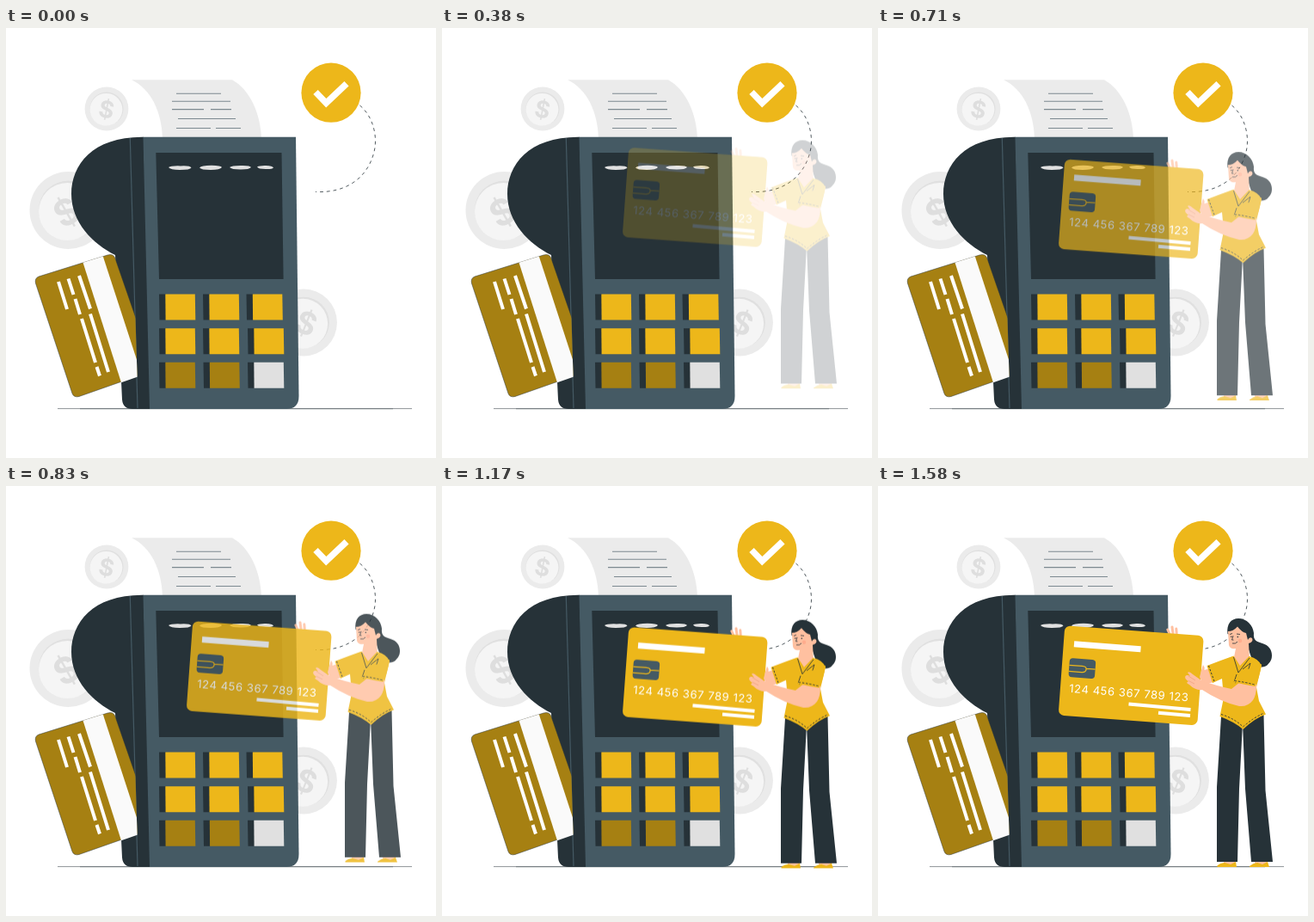
These frames come from a looping animation (500x500 px, 1.62 s). An HTML page:

```html
<!DOCTYPE html>
<html lang="en">
<head>
<meta charset="utf-8">
<title>Card payment</title>
<style>
  html, body { margin: 0; width: 100%; height: 100%; overflow: hidden; background: #fff; }
  svg { display: block; width: 100vw; height: 100vh; }
  .gold { fill: #edb71a; }
  .ochre { fill: #a68012; }
  .dark { fill: #263238; }
  .slate { fill: #455a64; }
  .skin { fill: #ffc0a0; }
  .light { fill: #e0e0e0; }
  .line { fill: none; stroke: #263238; stroke-width: .8; }
  .white { fill: none; stroke: #fff; stroke-width: 4; }
  .seam { fill: none; stroke: #263238; stroke-width: .9; stroke-dasharray: 2.4 1.8; }
  .dollar { font: 700 42px Inter, sans-serif; text-anchor: middle; fill: #dedede; }
  .digits { font: 400 13px Inter, sans-serif; letter-spacing: .6px; fill: #fff; }

  .drop { animation: drop 1620ms infinite, show 1620ms step-end infinite; }
  @keyframes drop {
    0% { transform: translateY(-30px); opacity: 0; }
    .93% {
      transform: translateY(-30px); opacity: 0;
      animation-timing-function: cubic-bezier(.36, -.01, .5, 1.38);
    }
    93.5%, 100% { transform: translateY(0); opacity: 1; }
  }
  @keyframes show {
    0% { visibility: hidden; }
    10.49%, 100% { visibility: visible; }
  }
</style>
</head>
<body>
<svg viewBox="0 0 500 500">
  <defs>
    <g id="coin">
      <circle r="45" fill="#ebebeb"/>
      <circle r="34.5" class="light"/>
      <circle r="33.5" cx="-1" cy="1.5" fill="#f5f5f5"/>
    </g>
    <g id="key">
      <path class="dark" d="M0 0H8V30H.5Z"/>
      <path d="M7.3 0H41.8L42.3 30H7.6Z"/>
    </g>
    <clipPath id="slot"><path d="M0 240H147.5L153.3 430H0Z"/></clipPath>
  </defs>

  <!-- coins -->
  <use href="#coin" x="72.5" y="212"/>
  <text class="dollar" transform="translate(70 214) rotate(-30)" dy=".36em">$</text>
  <use href="#coin" transform="translate(117 94) scale(.565)"/>
  <text class="dollar" transform="translate(117 94.5) rotate(11) scale(.65)" dy=".36em">$</text>
  <use href="#coin" transform="translate(346 342.5) scale(.865)"/>
  <text class="dollar" transform="translate(349 343) rotate(22) scale(.86)" dy=".36em">$</text>

  <!-- ground -->
  <path class="line" d="M60 442.6H472" stroke-width=".6" opacity=".65"/>
  <path class="line" d="M86 442.8H450" opacity=".5"/>

  <!-- receipt -->
  <path fill="#ebebeb" d="M146 60.3H263C284 72 296 100 297 128H182C181 98 169 71 146 60.3Z"/>
  <path fill="none" stroke="#7c8990" stroke-width="1.1"
    d="M198 76.3H250M193 85.2H261M193 94.6H230M238 94.6H262M200 105.5H267M198 116.5H238M244 116.5H273"/>

  <!-- terminal -->
  <path class="dark" d="M160 126.7C101 126 76 159 76 193C76 226 101 251 127 264L135 432Q136 443 147 443H170Z"/>
  <path class="slate" d="M159.5 126.7H337L340.5 428Q340.500 443 326 443H167Z"/>
  <path fill="none" stroke="#455a64" stroke-width="1.2" d="M144.300 128L153 442"/>
  <path class="dark" d="M174.300 145H320.500L322.600 292H178Z"/>
  <path class="light" d="M189 162Q192 160 203 160.400Q214 159.800 215.500 162.500Q214 165 202 165Q191 165 189 162Z
    M225 162.500Q227 160 239 159.800Q250 160 251 162Q249 165 238 165Q227 165 225 162.500Z
    M260 162Q262 160 273 160Q284 159.700 285 162Q283 164.500 273 164.500Q262 164.500 260 162Z
    M292 161.500Q295 159.800 302 160Q310 160 311 162.500Q309 164.400 302 164Q293 164 292 161.500Z"/>
  <g class="gold">
    <use href="#key" x="178" y="309.500"/>
    <use href="#key" x="229" y="309.500"/>
    <use href="#key" x="279.500" y="309.500"/>
    <use href="#key" x="178" y="349.300"/>
    <use href="#key" x="229" y="349.300"/>
    <use href="#key" x="281" y="349.300"/>
  </g>
  <g class="ochre">
    <use href="#key" x="178" y="388.800"/>
    <use href="#key" x="229.500" y="388.800"/>
  </g>
  <use class="light" href="#key" x="281" y="388.800"/>

  <!-- swiped card -->
  <g clip-path="url(#slot)">
    <path class="ochre" stroke="#263238" stroke-width=".5"
      d="M38 289L118 264Q125 262 127 268L172 398L85 428.500Q79 430 77 425L34.500 297Q33 291 38 289Z"/>
    <path fill="#fafafa" d="M89.500 272.800L112.800 265.600L158 404L134 412.200Z"/>
    <path class="white" d="M61 295L71 327M72.500 291.500L78.500 310M85 288L98 326.500M80.500 315L86 333
      M88 338L104 389M98 332.500L119 400M105.500 394L109 404.500"/>
  </g>

  <!-- approval -->
  <path class="line" stroke-dasharray="3.800 4" d="M411.500 90C427 103 433 127 427.500 146C419 176 394 192 360 190.500"/>
  <circle class="gold" cx="378" cy="75.200" r="34.600"/>
  <path fill="none" stroke="#fff" stroke-width="7.500" d="M360 74.500L372.300 87.300L396 64.800"/>

  <g class="drop">
    <!-- held card -->
    <path fill="none" stroke="#ffc0a0" stroke-width="3" stroke-linecap="round"
      d="M340 174L336.800 167M343.500 175L342 164M347.500 175L346.800 166"/>
    <rect class="gold" width="162" height="104.500" rx="6.500"
      transform="translate(217.300 162.300) rotate(4.200)"/>
    <path class="white" stroke-width="7" style="stroke-width:7px" d="M228 183.800L305.500 189.800"/>
    <path class="white" d="M291.500 253.500L363.500 260M326 263.800L363 267"/>
    <g transform="translate(223 200) rotate(4.200)">
      <rect class="slate" width="30.500" height="22" rx="4"/>
      <path fill="none" stroke="#edb71a" stroke-width="1.300"
        d="M0 8.300H15Q20 8.300 20 11.300Q20 15.500 15 15.500H0M20 11H30.500"/>
    </g>
    <text class="digits" transform="translate(222 239.800) rotate(4.400)">124 456 367 789 123</text>

    <!-- legs -->
    <path class="skin" d="M402 435H416V440H402ZM438 435H453V440H438Z"/>
    <path class="gold" d="M394 442Q397 438.500 403 438L410 440L416 437L417 443H395ZM432 442Q436 438.500 441 438L447 440L453 437L455 443H432Z"/>
    <path class="dark" d="M399 268L394 350V437H418L420 352L424 276L427 352L434 437H459L450.500 354L448.500 266Z"/>

    <!-- hair and head -->
    <path class="dark" d="M406.500 172C405 160 411 154 419 154C429 154 436 162 437 171C436 180 441 181 447 183
      C454 185 458 190 458 197C458 204 454 206 453 208C449 212 441 211 438 206C433 200 432 191 429 185Z"/>
    <path class="skin" d="M407 169Q413 169 418 163.500Q423 170 428 171L430 179Q432 175 435 177Q437 181 431 183
      L432 202L421 213L414 199L416 189Q409 190 408 185Z"/>
    <path class="line" d="M409 172.500L412 171.500M417 172L421 172.500M413 174L411.500 179H413.500M412 183Q416 184 418 181"/>
    <circle class="dark" cx="410.800" cy="175.300" r=".8"/>
    <circle class="dark" cx="418.300" cy="175.500" r=".8"/>
    <circle cx="421" cy="180" r="2.200" fill="#ff9a7c" opacity=".5"/>

    <!-- far arm -->
    <path class="skin" d="M374 222Q376 214 378 208Q380 210 379.500 214L386 212L391 228L378 231Z"/>

    <!-- blouse -->
    <path class="gold" d="M413.500 197.500L421 209L431.500 198Q443 201 446 209L440 234L443 250L451 265.500
      Q438 270 424.500 283Q414 274 397.500 268L402 246L400 224L389 229L382.500 209Q398 203 413.500 197.500Z"/>
    <path class="seam" d="M384.500 209L391 227M399 265.500Q414 270 424.500 280Q437 269 449 264M443.500 211L436.500 225"/>
    <path class="line" d="M413.500 199L419 217L432 200M424 213L433 206L429 219L415 229M417 219L414 228"/>

    <!-- near arm -->
    <path class="skin" d="M357.500 221Q359 219 363 221L360 217Q362 215 366 219L376 226Q392 232 411 236L421 228
      L439 221Q442 240 436 249Q430 257 420 256Q398 251 377 237Q369 238 362 231Q357 229 361 227Q356 224 357.500 221Z"/>
    <path class="gold" d="M446 207Q443 225 438.500 233Q426 231 413 228L425 215Z"/>
    <path class="seam" d="M414.500 226.500Q427 228 438 231"/>
    <path fill="none" stroke="#e89b7a" stroke-width=".6" d="M361 221L369 226M361 226.500L368 230"/>
  </g>
</svg>
</body>
</html>
```
